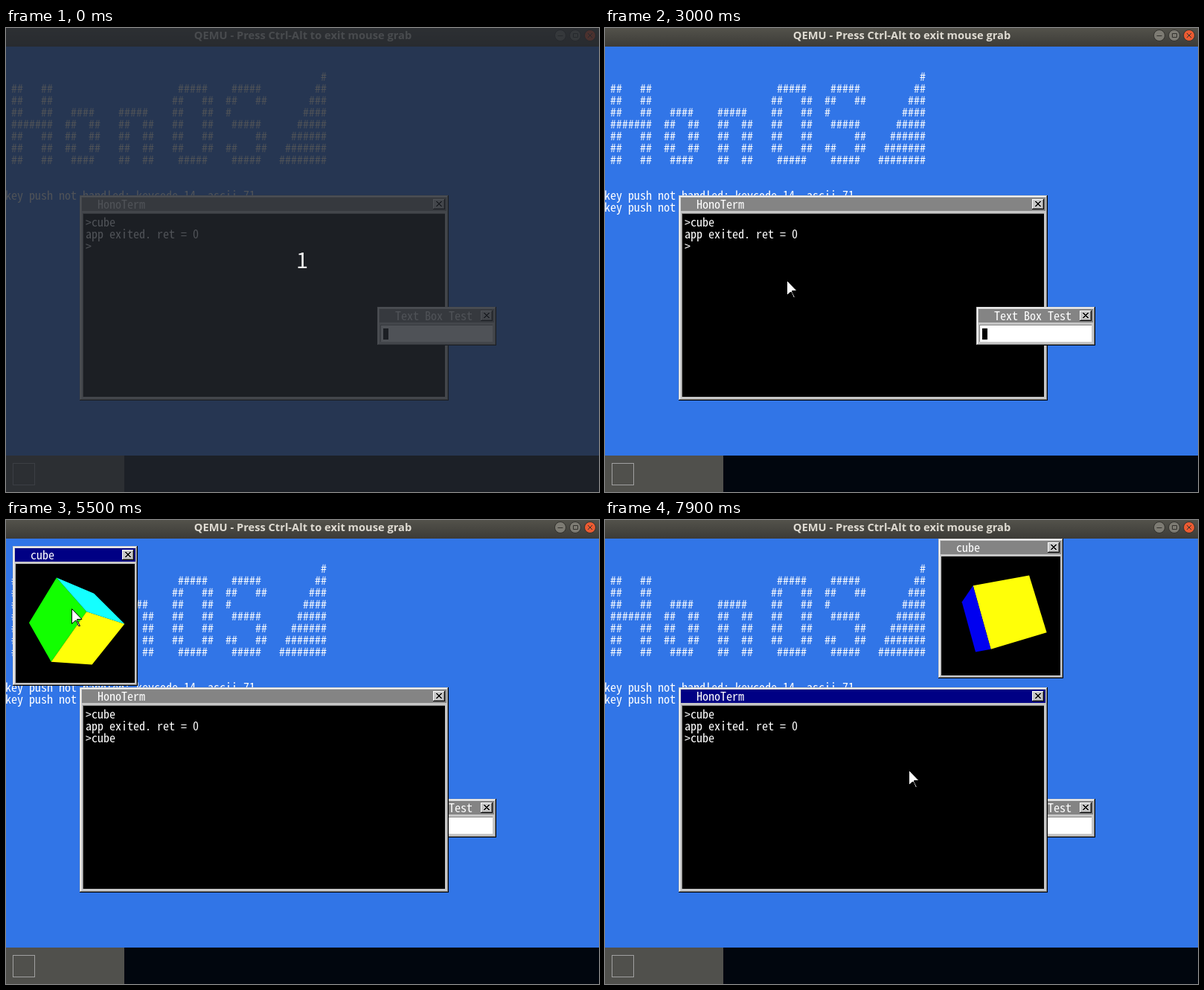
Animation of 797x624 px, one loop 8000 ms. Source, as an HTML page with a canvas:

```html
<!DOCTYPE html>
<html lang="en">
<head>
<meta charset="utf-8">
<title>Desktop with rotating cube</title>
<style>
html, body { margin: 0; width: 100%; height: 100%; overflow: hidden; background: #3175e7; }
canvas { display: block; }
</style>
</head>
<body>
<canvas id="stage" width="797" height="624"></canvas>
<script>
const ctx = document.getElementById('stage').getContext('2d');
const LOOP = 8000;
const LIGHT = '#c6c6c6', SHADE = '#848484', NAVY = '#000084';
const CELL_FONT = '16px "Noto Sans Mono CJK JP", "Noto Sans CJK JP", "Liberation Mono", monospace';

const BANNER = [
  '                                                     #',
  ' ##   ##                     #####    #####         ##',
  ' ##   ##                    ##   ##  ##   ##       ###',
  ' ##   ##   ####    #####    ##   ##  #            ####',
  ' #######  ##  ##   ##  ##   ##   ##   #####      #####',
  ' ##   ##  ##  ##   ##  ##   ##   ##       ##    ######',
  ' ##   ##  ##  ##   ##  ##   ##   ##  ##   ##   #######',
  ' ##   ##   ####    ##  ##    #####    #####   ########',
];
const KEY_MESSAGE = 'key push not handled: keycode 14, ascii 71';

// Keyframes: [time, value, ...]
const MOUSE = [
  [2300, 420, 594], [2400, 515, 430], [2500, 400, 220], [2600, 260, 168], [2700, 140, 240],
  [2800, 92, 350], [2900, 190, 375], [3000, 244, 339], [3200, 244, 339], [3500, 249, 343],
  [4300, 249, 343], [5200, 155, 237], [5500, 88, 119], [5800, 74, 70], [6000, 76, 47],
  [6100, 79, 50], [6200, 170, 70], [6300, 330, 72], [6400, 507, 55], [6600, 522, 37],
  [6700, 515, 37], [6900, 508, 60], [7300, 425, 310], [7400, 410, 335], [7500, 402, 336], [7900, 408, 336],
];
const CUBE_STEPS = [[4200, 2], [5500, 26], [6700, 52], [7900, 75]];
const TERM_CURSOR = [[200, 700], [1200, 1700], [2300, 2700], [3500, 3700], [4000, 4200]];
const BOX_CURSOR = [[0, 200], [700, 1200], [1700, 2300], [2700, 3200]];

const within = (spans, t) => spans.some(([from, to]) => t >= from && t < to);

function sample(keys, t) {
  let i = 0;
  while (i < keys.length - 2 && t >= keys[i + 1][0]) i++;
  const [t0, ...a] = keys[i], [t1, ...b] = keys[i + 1];
  const u = Math.min(1, Math.max(0, (t - t0) / (t1 - t0)));
  return a.map((v, k) => Math.round(v + (b[k] - v) * u));
}

function rect(x, y, w, h, color) {
  ctx.fillStyle = color;
  ctx.fillRect(x, y, w, h);
}

function polygon(points, color) {
  ctx.fillStyle = color;
  ctx.beginPath();
  points.forEach(([x, y]) => ctx.lineTo(x, y));
  ctx.closePath();
  ctx.fill();
}

// Console text sits on a grid of 8 x 16 cells.
function print(text, x, y) {
  ctx.font = CELL_FONT;
  ctx.textAlign = 'center';
  ctx.fillStyle = '#fff';
  [...text].forEach((ch, i) => ch !== ' ' && ctx.fillText(ch, x + 8 * i + 4, y + 14));
}

function closeButton(x, y) {
  rect(x, y, 16, 14, '#000');
  rect(x, y, 15, 13, '#fff');
  rect(x + 1, y + 1, 14, 12, SHADE);
  rect(x + 1, y + 1, 13, 11, LIGHT);
  rect(x + 15, y, 1, 14, '#000');
  for (let i = 0; i < 7; i++) {
    rect(x + 4 + i, y + 3 + i, 2, 1, '#000');
    rect(x + 10 - i, y + 3 + i, 2, 1, '#000');
  }
}

function windowFrame(x, y, w, h, title, active) {
  rect(x, y, w, h, '#000');
  rect(x, y, w - 1, h - 1, LIGHT);
  rect(x + 1, y + 1, w - 2, h - 2, SHADE);
  rect(x + 1, y + 1, w - 3, h - 3, '#fff');
  rect(x + 2, y + 2, w - 4, h - 4, LIGHT);
  rect(x + 3, y + 3, w - 6, 18, active ? NAVY : SHADE);
  print(title, x + 24, y + 4);
  closeButton(x + w - 21, y + 5);
}

function sunkenPane(x, y, w, h, color) {
  rect(x, y, w, h, LIGHT);
  rect(x, y, w - 1, 1, SHADE);
  rect(x, y, 1, h - 1, SHADE);
  rect(x + 1, y + 1, w - 2, h - 2, color);
}

function drawTitleBar() {
  const gradient = ctx.createLinearGradient(0, 0, 0, 25);
  gradient.addColorStop(0, '#53524b');
  gradient.addColorStop(1, '#3c3b37');
  rect(0, 0, 797, 25, gradient);
  ctx.font = 'bold 14.67px "Open Sans", "Noto Sans", sans-serif';
  ctx.textAlign = 'center';
  ctx.fillStyle = '#dfdbd2';
  ctx.fillText('QEMU - Press Ctrl-Alt to exit mouse grab', 399, 15);
  ['#7d7b73', '#7d7b73', '#ec5b32'].forEach((color, i) => {
    ctx.beginPath();
    ctx.arc(745 + 20 * i, 10, 7.5, 0, 7);
    ctx.fillStyle = color;
    ctx.fill();
    ctx.strokeStyle = '#33322e';
    ctx.lineWidth = 1;
    ctx.stroke();
  });
  ctx.stroke(new Path2D('M741.5 10.5h7M762.5 7.5h6v5h-6zM782 7l6 6M788 7l-6 6'));
}

function drawDesktop(t) {
  rect(0, 25, 797, 550, '#3175e7');
  BANNER.forEach((line, i) => print(line, -1, 57 + 16 * i));
  print(KEY_MESSAGE, -1, 217);
  if (t >= 700) print(KEY_MESSAGE, -1, 233);
  rect(0, 575, 797, 49, '#01060e');
  rect(0, 575, 159, 49, '#50504c');
  ctx.strokeStyle = '#a0a0a0';
  ctx.lineWidth = 1;
  ctx.strokeRect(9.5, 585.5, 29, 29);
}

function drawTextBox(t) {
  windowFrame(499, 375, 160, 52, 'Text Box Test', false);
  sunkenPane(503, 399, 152, 24, '#fff');
  if (within(BOX_CURSOR, t)) rect(507, 404, 7, 15, '#000');
}

function drawTerminal(t) {
  const active = t >= 3200 && t < 4200 || t >= 7400;
  windowFrame(99, 225, 496, 276, 'HonoTerm', active);
  sunkenPane(103, 249, 488, 248, '#000');
  const prompt = t >= 4000 ? '>cube' : '>';
  ['>cube', 'app exited. ret = 0', prompt].forEach((line, i) => print(line, 107, 253 + 16 * i));
  if (within(TERM_CURSOR, t)) rect(107 + 8 * prompt.length, 285, 7, 15, '#fff');
}

// Vertex i has x, y, z signs in bits 2, 1, 0 (a set bit means -1).
const FACES = [
  [[0, 4, 6, 2], '#f00'], [[1, 3, 7, 5], '#12ff00'], [[0, 2, 3, 1], '#ffff08'],
  [[0, 1, 5, 4], '#0000f0'], [[4, 5, 7, 6], '#f0f'], [[6, 7, 3, 2], '#14ffff'],
];

function drawCube(cx, cy, step) {
  const scale = 50, degree = step * Math.PI / 180;
  const turn = (a, b, angle) => [
    a * Math.cos(angle) - b * Math.sin(angle),
    b * Math.cos(angle) + a * Math.sin(angle),
  ];
  const screen = Array.from({ length: 8 }, (_, i) => {
    let [x, y, z] = [4, 2, 1].map(bit => i & bit ? -scale : scale);
    [y, z] = turn(y, z, degree);
    [z, x] = turn(z, x, 1.5 * degree);
    [x, y] = turn(x, y, 2 * degree);
    const depth = 6 * scale / (z + 8 * scale);
    return [cx + x * depth, cy + y * depth];
  });
  for (const [corners, color] of FACES) {
    const points = corners.map(i => screen[i]);
    const [a, b, c] = points;
    const facing = (b[0] - a[0]) * (c[1] - b[1]) <= (b[1] - a[1]) * (c[0] - b[0]);
    if (facing) polygon(points, color);
  }
}

function drawCubeWindow(t, mouse) {
  let [x, y] = [9, 35];
  if (t >= 6700) [x, y] = [448, 25];
  else if (t >= 6000) [x, y] = [mouse[0] - 67, mouse[1] - 12];
  windowFrame(x, y, 168, 188, 'cube', t < 7400);
  rect(x + 4, y + 24, 160, 160, '#000');
  drawCube(x + 84, y + 104, sample(CUBE_STEPS, t)[0]);
}

const POINTER = new Path2D('M.5 .5L14 14.5H7.5V15.5L11.5 23.5H9.5L6.5 16.5H5L.5 20.5Z');

function drawPointer([x, y]) {
  ctx.save();
  ctx.translate(x, y);
  ctx.fillStyle = '#fff';
  ctx.strokeStyle = '#000';
  ctx.lineWidth = 1;
  ctx.fill(POINTER);
  ctx.stroke(POINTER);
  ctx.restore();
}

function drawCountdown() {
  rect(0, 0, 797, 624, 'rgba(36, 39, 46, .8)');
  ctx.font = '29px "Noto Sans CJK JP", "DejaVu Sans", sans-serif';
  ctx.textAlign = 'center';
  ctx.fillStyle = '#eee';
  ctx.fillText('1', 398, 323);
}

function draw(time) {
  // The screen refreshes every 100 ms and skips two refreshes.
  let t = Math.floor(time / 100) * 100;
  if (t === 4300 || t === 6500) t -= 100;
  const mouse = sample(MOUSE, t);

  drawDesktop(t);
  drawTitleBar();
  if (t < 3200) {
    drawTerminal(t);
    drawTextBox(t);
  } else {
    drawTextBox(t);
    drawTerminal(t);
  }
  if (t >= 4200) drawCubeWindow(t, mouse);
  if (t >= 2300) drawPointer(mouse);
  if (t < 200) drawCountdown();
}

function tick() {
  draw(performance.now() % LOOP);
  requestAnimationFrame(tick);
}
tick();
</script>
</body>
</html>
```
